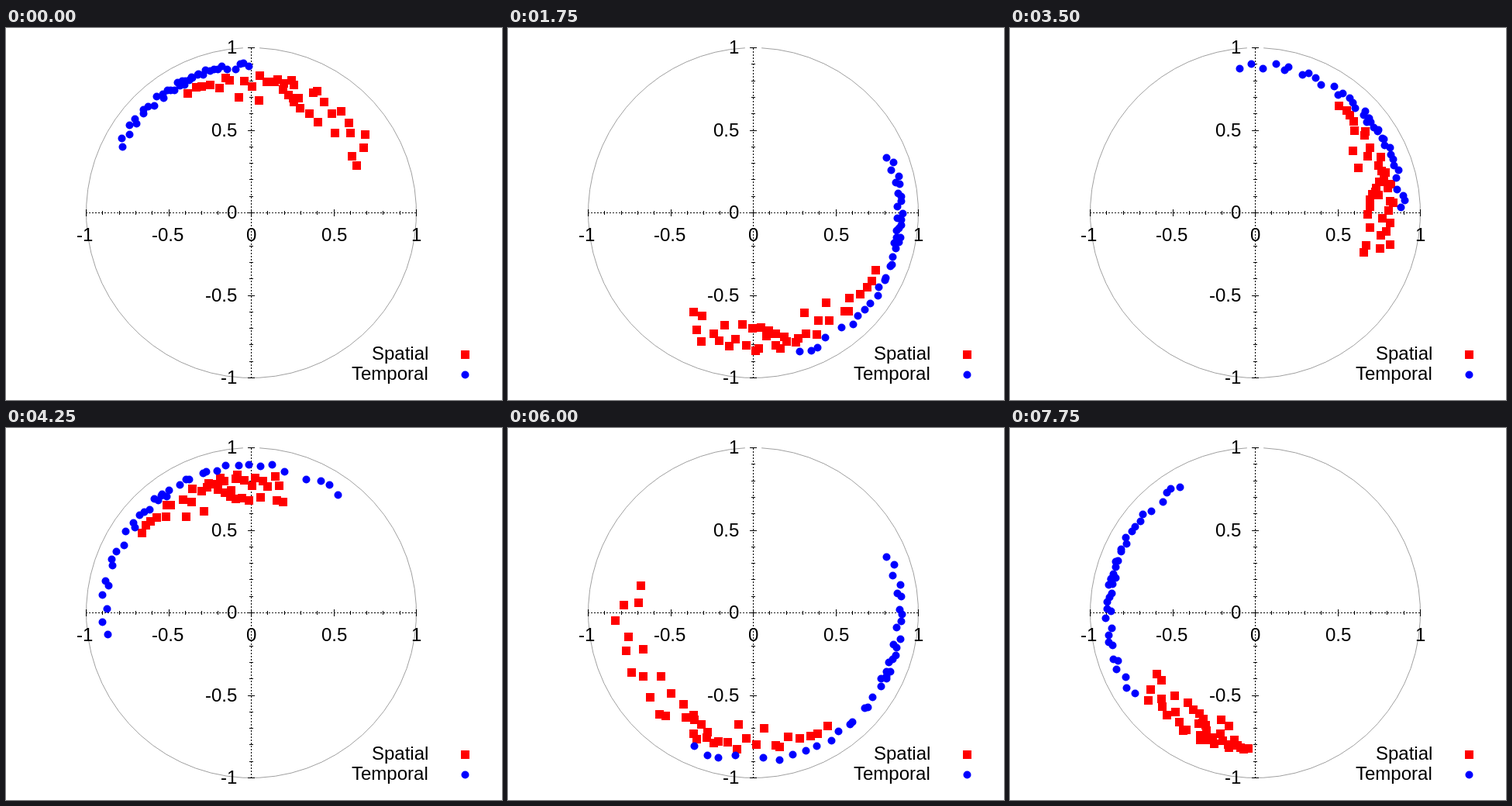
Recreate the animation shown at these times as an HTML page with a canvas. Size 640x480 px, loop 8 s.

```html
<!DOCTYPE html>
<html lang="en">
<head>
<meta charset="utf-8">
<title>Spatial and temporal phases</title>
<style>
html, body { margin: 0; width: 100%; height: 100%; overflow: hidden; background: #fff; }
canvas { display: block; }
</style>
</head>
<body>
<canvas id="stage" width="640" height="480"></canvas>
<script>
const ctx = document.getElementById('stage').getContext('2d');
const CX = 316.5, CY = 238.5, R = 213;
const STEP_MS = 250, STEPS = 32, COUNT = 38;

// Each swarm drifts counterclockwise: its tail, middle and head in unwrapped degrees.
const KEYS = [
  { step: 0, spatial: [24, 72, 118], temporal: [91, 118, 153] },
  { step: 4, spatial: [222, 267, 289], temporal: [255, 300, 322] },
  { step: 10, spatial: [256, 293, 381], temporal: [322, 398, 443] },
  { step: 14, spatial: [340, 371, 412], temporal: [722, 760, 816] },
  { step: 20, spatial: [528, 553, 596], temporal: [825, 935, 1001] },
  { step: 27, spatial: [525, 643, 714], temporal: [1072, 1144, 1179] },
  { step: 31, spatial: [932, 966, 987], temporal: [1201, 1247, 1294] }
];

const mix = (a, b, t) => a + (b - a) * t;

function random(seed) {
  const x = Math.sin(seed * 127.1 + 11.7) * 43758.5453;
  return x - Math.floor(x);
}

// Place u (0 = tail, 1 = head) in a swarm that is densest at its middle.
function spread([tail, middle, head], u) {
  const side = 2 * u - 1;
  return mix(middle, side < 0 ? tail : head, Math.abs(side) ** 1.4);
}

function drawSwarm(name, step, seed, radius, marker) {
  const next = KEYS.findIndex((key, i) => i > 0 && step <= key.step);
  const a = KEYS[next - 1], b = KEYS[next];
  const t = (step - a.step) / (b.step - a.step);
  for (let i = 0; i < COUNT; i++) {
    const jitter = i % (COUNT - 1) ? random(seed + i) - 0.5 : 0;
    const u = (i + jitter) / (COUNT - 1);
    const angle = mix(spread(a[name], u), spread(b[name], u), t) * Math.PI / 180;
    const r = R * radius(random(seed + i + 100));
    marker(CX - 0.5 + r * Math.cos(angle), CY - 0.5 - r * Math.sin(angle));
  }
}

function square(x, y) {
  ctx.fillStyle = '#f00';
  ctx.fillRect(Math.round(x) - 5, Math.round(y) - 5, 11, 11);
}

function dot(x, y) {
  ctx.fillStyle = '#00f';
  ctx.beginPath();
  ctx.arc(Math.round(x) + 0.5, Math.round(y) + 0.5, 5, 0, 2 * Math.PI);
  ctx.fill();
}

function line(x1, y1, x2, y2) {
  ctx.beginPath();
  ctx.moveTo(x1, y1);
  ctx.lineTo(x2, y2);
  ctx.stroke();
}

// align: 0.5 centres the text on x, 1 ends it there; glyphs start on whole pixels.
function label(text, x, y, align) {
  ctx.fillText(text, Math.round(x - ctx.measureText(text).width * align), y);
}

function drawAxes() {
  ctx.lineWidth = 1;
  ctx.strokeStyle = '#a0a0a0';
  ctx.beginPath();
  const gap = 0.05;
  ctx.arc(CX, CY, R, gap - Math.PI / 2, 1.5 * Math.PI - gap);
  ctx.stroke();

  ctx.strokeStyle = '#000';
  ctx.setLineDash([2, 2]);
  line(103, CY, 530, CY);
  line(CX, 452, CX, 25);
  ctx.setLineDash([]);

  ctx.fillStyle = '#000';
  ctx.font = '24px "Liberation Sans", Arial, sans-serif';
  for (let i = -10; i <= 10; i++) {
    const major = i % 5 === 0;
    const size = major ? 4.5 : 2.5;
    const x = Math.floor(CX + i * R / 10) + 0.5;
    const y = Math.floor(CY - i * R / 10) + 0.5;
    line(x, CY - size, x, CY + size);
    line(CX - size, y, CX + size, y);
    if (major) {
      label(String(i / 10), i < 0 ? x - 2 : x, 275, 0.5);
      label(String(i / 10), 298.5, y + 7.5, 1);
    }
  }
  label('Spatial', 545, 428, 1);
  label('Temporal', 545, 454, 1);
}

function draw(now) {
  const step = Math.floor(now / STEP_MS) % STEPS;
  ctx.fillStyle = '#fff';
  ctx.fillRect(0, 0, 640, 480);
  drawAxes();
  drawSwarm('spatial', step, 3, n => 0.84 - 0.16 * n ** 1.3, square);
  drawSwarm('temporal', step, 500, n => 0.87 + 0.04 * n, dot);
  square(592, 421);
  dot(592, 447);
}

const start = performance.now();
function tick() {
  draw(performance.now() - start);
  requestAnimationFrame(tick);
}
tick();
</script>
</body>
</html>
```
